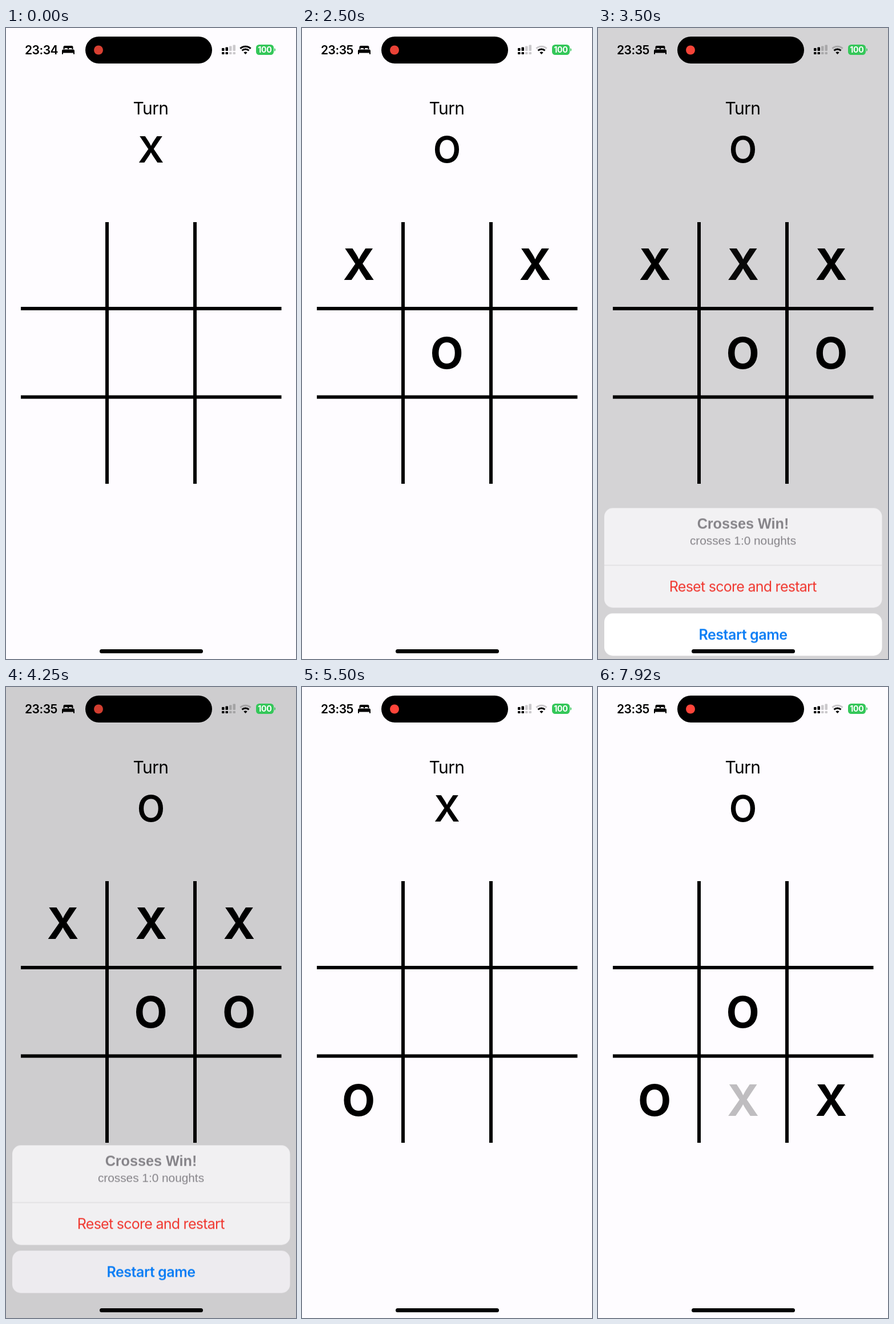
Animation, 508 px wide and 1102 px high, one loop 8 s. Source, as an HTML page:

```html
<!DOCTYPE html>
<html lang="en">
<head>
<meta charset="utf-8">
<title>Noughts and crosses</title>
<style>
  html, body { margin: 0; width: 100%; height: 100%; overflow: hidden; background: #fefcff; }
  svg { display: block; width: 100vw; height: 100vh; }
  text { font-family: Inter, Roboto, sans-serif; text-anchor: middle; }
  .anim, .mark { animation: 8s linear infinite; }

  .time { font-size: 21px; font-weight: 600; letter-spacing: -.5px; text-anchor: start; }
  .charge { font-size: 14px; font-weight: 700; letter-spacing: -.3px; fill: #fff; }
  .label { font-size: 30px; letter-spacing: -.6px; }
  .turn { font-size: 63px; font-weight: 600; }
  .mark { font-size: 75.5px; font-weight: 700; opacity: 0; }
  .title, .score { font-family: "Liberation Sans", Arial, sans-serif; fill: #858388; }
  .title { font-size: 25.2px; font-weight: 700; }
  .score { font-size: 20.8px; }
  .action { font-size: 25px; }
  .reset { fill: #f0352d; letter-spacing: -.73px; }
  .restart { fill: #087cf5; font-weight: 600; letter-spacing: -.45px; }
  .faint { opacity: .2; }

  /* Board marks: fade in when played, out when the board is cleared */
  .tl { animation-name: tl; }
  .tm { animation-name: tm; }
  .tr { animation-name: tr; }
  .mm { animation-name: mm; }
  .mr { animation-name: mr; }
  .bl { animation-name: bl; }
  .bm { animation-name: bm; }
  .br { animation-name: br; }
  @keyframes tl { 0%, 5.625% { opacity: 0 } 8.75%, 57.125% { opacity: 1 } 59.6%, to { opacity: 0 } }
  @keyframes tm { 0%, 40.775% { opacity: 0 } 43.9%, 57.125% { opacity: 1 } 59.6%, to { opacity: 0 } }
  @keyframes tr { 0%, 25% { opacity: 0 } 28.125%, 57.125% { opacity: 1 } 59.6%, to { opacity: 0 } }
  @keyframes mm {
    0%, 14.75% { opacity: 0 } 17.875%, 57.125% { opacity: 1 }
    59.6%, 90.625% { opacity: 0 } 93.75%, to { opacity: 1 }
  }
  @keyframes mr { 0%, 34% { opacity: 0 } 37.125%, 57.125% { opacity: 1 } 59.6%, to { opacity: 0 } }
  @keyframes bl { 0%, 65% { opacity: 0 } 68.125%, to { opacity: 1 } }
  @keyframes bm { 0%, 98.25% { opacity: 0 } to { opacity: .56 } }
  @keyframes br { 0%, 82.5% { opacity: 0 } 85.625%, to { opacity: 1 } }

  .turn-x, .turn-o, .before, .after, .wifi { animation-timing-function: step-end; }
  .turn-x { animation-name: turn-x; }
  .turn-o { animation-name: turn-o; }
  @keyframes turn-x {
    0%, 14.75%, 34%, 65%, 90.625% { opacity: 1 }
    5.625%, 25%, 40.775%, 82.5%, 98.25%, to { opacity: 0 }
  }
  @keyframes turn-o {
    0%, 14.75%, 34%, 65%, 90.625% { opacity: 0 }
    5.625%, 25%, 40.775%, 82.5%, 98.25%, to { opacity: 1 }
  }

  .before { animation-name: before; }
  .after { animation-name: after; }
  .wifi { animation-name: wifi; }
  @keyframes before { 0% { opacity: 1 } 26%, to { opacity: 0 } }
  @keyframes after { 0% { opacity: 0 } 26%, to { opacity: 1 } }
  @keyframes wifi { 0% { opacity: 1 } 11.5%, to { opacity: .2 } }

  .rec { animation-name: rec; animation-timing-function: ease-in-out; }
  @keyframes rec {
    0% { fill: #d84032 } 10% { fill: #ff453a } 23% { fill: #d03e30 }
    38.5% { fill: #ff453a } 55% { fill: #d03e30 }
    68.75% { fill: #ff453a } 83.4% { fill: #d03e30 } 98.25%, to { fill: #ff453a }
  }

  .sheet { animation-name: sheet; animation-timing-function: ease; }
  .dim { animation-name: dim; animation-timing-function: ease; }
  .cancel { animation-name: press; }
  @keyframes sheet {
    0%, 40.85% { transform: translateY(302px) }
    45.85%, 53.125% { transform: none }
    57.125%, to { transform: translateY(302px) }
  }
  @keyframes dim {
    0%, 40.85% { opacity: 0 } 45.85%, 53.125% { opacity: .19 } 57.125%, to { opacity: 0 }
  }
  @keyframes press { 0%, 52.4% { fill: #fff } 52.8%, to { fill: #edebef } }
</style>
</head>
<body>
<svg viewBox="0 0 508 1102" preserveAspectRatio="none">
  <rect width="508" height="1102" fill="#fefcff"/>
  <rect class="anim dim" width="508" height="1102"/>

  <text class="label" x="253.5" y="150.5">Turn</text>
  <text class="turn anim turn-x" x="254" y="235">X</text>
  <text class="turn anim turn-o" x="254" y="235">O</text>

  <path d="M177 339V796M331 339V796M26 490H482.5M26 644.5H482.5" stroke="#000" stroke-width="6"/>

  <text class="mark tl" x="99.7" y="440">X</text>
  <text class="mark tm" x="254" y="440">X</text>
  <text class="mark tr" x="408.4" y="440">X</text>
  <text class="mark mm" x="253.5" y="595">O</text>
  <text class="mark mr" x="408" y="595">O</text>
  <text class="mark bl" x="99" y="749">O</text>
  <text class="mark bm" x="254" y="749">X</text>
  <text class="mark br" x="408.4" y="749">X</text>

  <g class="anim sheet">
    <rect x="11" y="800" width="486.5" height="174" rx="15" fill="#f8f7f9" fill-opacity=".83"/>
    <path d="M11 900H497.5" stroke="#d5d3d6"/>
    <text class="title" x="254" y="835.5">Crosses Win!</text>
    <text class="score" x="254" y="864">crosses 1:0 noughts</text>
    <text class="action reset" x="253.7" y="946">Reset score and restart</text>
    <rect class="anim cancel" x="11" y="984" width="486.5" height="74" rx="15"/>
    <text class="action restart" x="254" y="1030">Restart game</text>
  </g>

  <!-- Status bar -->
  <text class="time anim before" x="33" y="46">23:34</text>
  <text class="time anim after" x="33" y="46">23:35</text>
  <path d="M100.500 37V33.500Q100.500 31 103 31H115Q117.500 31 117.500 33.500V37H115.500V36Q115.500 35 114.500 35H111Q110 35 110 36V37H108V36Q108 35 107 35H103.500Q102.500 35 102.500 36V37Z"/>
  <path d="M98 40Q98 37.500 100.500 37.500H117.500Q120 37.500 120 40V45Q120 46 119 46T118 45V43.500H100V45Q100 46 99 46T98 45Z"/>

  <rect x="139" y="15" width="222" height="47" rx="23.5"/>
  <circle class="anim rec" cx="162" cy="38.500" r="8"/>

  <g>
    <rect x="378" y="35" width="4.500" height="5" rx="1"/>
    <rect x="384.500" y="33.500" width="4.500" height="6.500" rx="1"/>
    <rect x="378" y="42" width="4.500" height="4" rx="1"/>
    <rect x="384.500" y="42" width="4.500" height="4" rx="1"/>
  </g>
  <g class="faint">
    <rect x="391" y="31.500" width="4.500" height="8.500" rx="1"/>
    <rect x="397.500" y="29.500" width="4.500" height="10.500" rx="1"/>
    <rect x="391" y="42" width="4.500" height="4" rx="1"/>
    <rect x="397.500" y="42" width="4.500" height="4" rx="1"/>
  </g>

  <g fill="none" stroke="#000" stroke-width="3">
    <path class="anim wifi" d="M410.400 35.900A13.200 13.200 0 0 1 428.600 35.900"/>
    <path d="M413.500 39.400A8.600 8.600 0 0 1 425.500 39.400"/>
  </g>
  <path d="M419.500 46L416.400 42.700Q419.500 40.300 422.600 42.700Z"/>

  <rect x="438" y="29" width="31" height="18" rx="5.500" fill="#34c759"/>
  <path d="M470 35Q472 36 472 38T470 41Z" fill="#34c759"/>
  <text class="charge" x="453.300" y="43">100</text>

  <rect x="164" y="1085" width="181" height="7" rx="3.500"/>
</svg>
</body>
</html>
```
